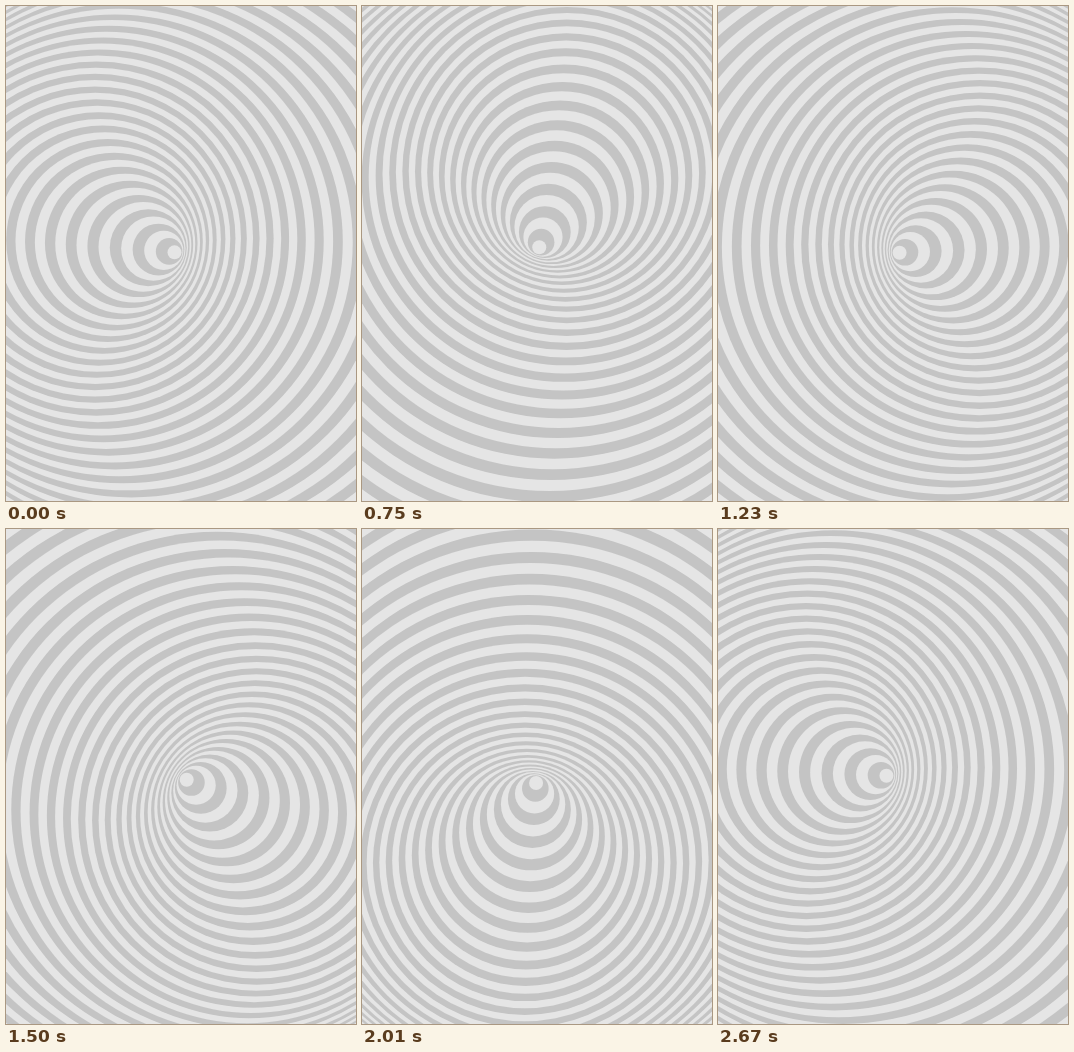
Write an HTML page with a canvas that moves like this. It is 350 px wide and 495 px high and loops after 2700 ms.

```html
<!DOCTYPE html>
<html lang="en">
<head>
<meta charset="utf-8">
<title>Rotating rings</title>
<style>
  html, body { margin: 0; width: 100%; height: 100%; overflow: hidden; background: #c4c4c4; }
  canvas { display: block; }
</style>
</head>
<body>
<canvas id="stage" width="350" height="495"></canvas>
<script>
const ctx = document.getElementById('stage').getContext('2d');
const CX = 175, CY = 247.5;
const LOOP = 2700, STEP = 30;
const RINGS = 50, GAP = 6.3, INNER = 7;
const SWING = 87.5;
const START = Math.PI * 190 / 180;
const COLORS = ['#e5e5e5', '#c4c4c4'];

function draw(time) {
  const angle = START + 2 * Math.PI * time / LOOP;
  const dx = Math.cos(angle), dy = Math.sin(angle);
  for (let i = RINGS - 1; i >= 0; i--) {
    const radius = INNER + i * GAP;
    const shift = SWING * Math.sin(Math.PI * (i + 1.2) / RINGS);
    ctx.fillStyle = COLORS[i % 2];
    ctx.beginPath();
    ctx.arc(CX + dx * shift, CY + dy * shift, radius, 0, 2 * Math.PI);
    ctx.fill();
  }
}

const begin = performance.now();
function tick() {
  const time = (performance.now() - begin) % LOOP;
  draw(Math.floor(time / STEP) * STEP);
  requestAnimationFrame(tick);
}
tick();
</script>
</body>
</html>
```
